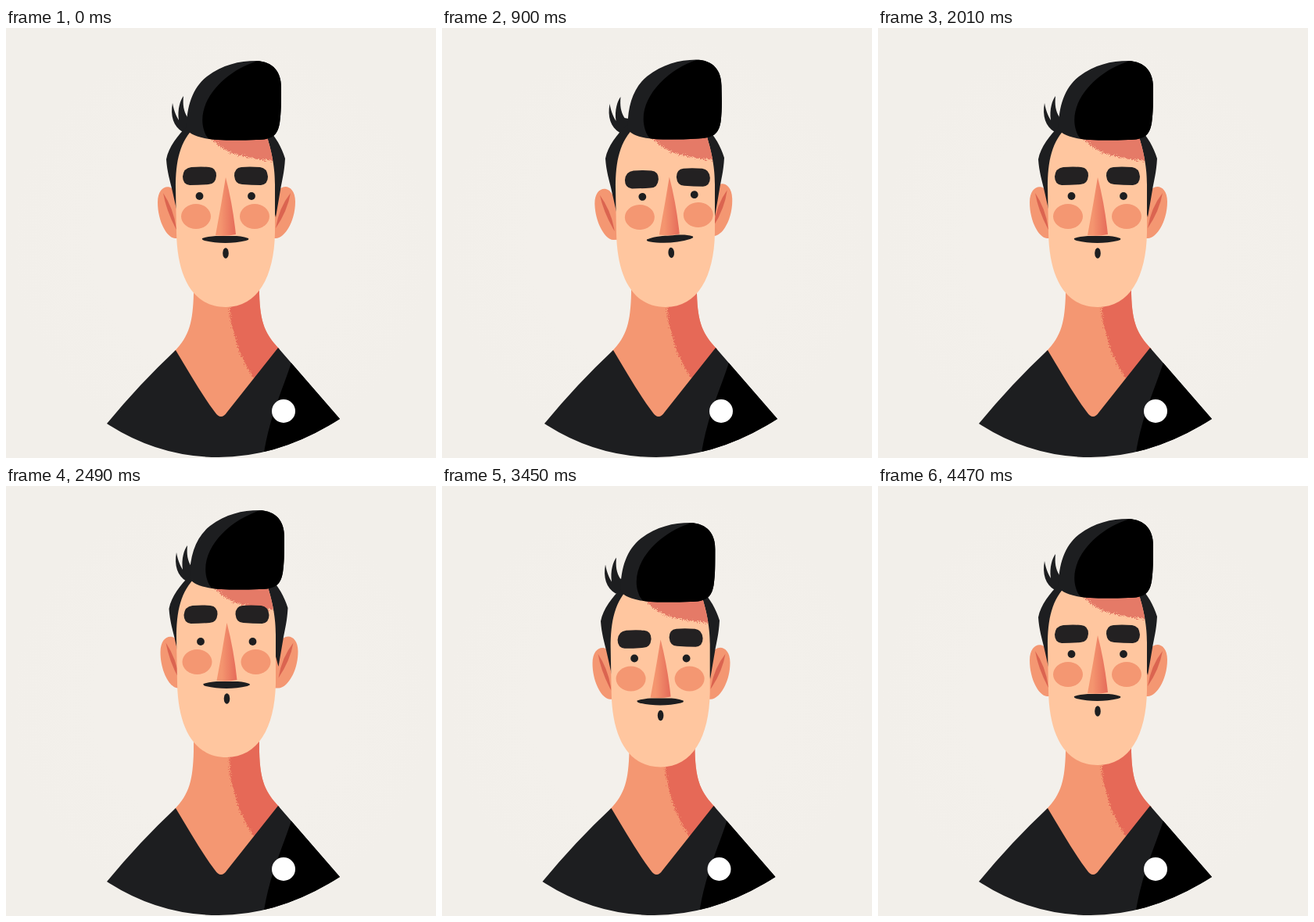
Animation, 550 px wide and 550 px high, one loop 4500 ms. Source, as an HTML page:

```html
<!DOCTYPE html>
<html lang="en">
<head>
<meta charset="utf-8">
<title>Portrait</title>
<style>
html, body { margin: 0; height: 100%; overflow: hidden; background: #f2efea; }
svg { display: block; width: 100%; height: 100%; }
.ink { fill: #1d1e20; }
.brow { fill: #232122; }
.skin { fill: #ffc69f; }
.tan { fill: #f49772; }
.shade { fill: #e66957; }
.crease { fill: #db6450; }
.lid { fill: none; stroke: #1d1e20; stroke-width: 3; stroke-linecap: round; }
</style>
</head>
<body>
<svg viewBox="0 0 550 550">
  <defs>
    <radialGradient id="paper">
      <stop offset=".6" stop-color="#f3f0eb"/><stop offset="1" stop-color="#f2efea"/>
    </radialGradient>
    <linearGradient id="noseTone">
      <stop offset=".25" stop-color="#f4956f"/><stop offset=".9" stop-color="#e7705c"/>
    </linearGradient>
    <filter id="grain" color-interpolation-filters="sRGB">
      <feTurbulence type="fractalNoise" baseFrequency=".7" numOctaves="2" seed="4"/>
      <feDisplacementMap in="SourceGraphic" scale="9" xChannelSelector="R" yChannelSelector="G"/>
    </filter>
    <path id="neckShape" d="M240 290V340C239 375 235 394 215 414L265 510H285L350 411C332 392 325 378 324 340V290Z"/>
    <path id="shirtShape" d="M129 506Q171 455 217 412C234 440 249 467 267 491Q275 503 283 491L348 409 427 500Q350 549 272 549Q195 549 129 506Z"/>
    <path id="faceShape" d="M243 125C222 145 217 170 217 205L218 262C219 320 240 357 281 357C322 357 343 318 344 262V200C344 180 341 160 331 130Z"/>
    <path id="hairShape" d="M231 127C231 100 239 76 257 62C277 47 298 42 320 42C342 43 352 56 352 76C352 96 352 108 350 122C347 138 340 143 320 143C295 144 270 144 254 141C240 138 232 134 231 127Z"/>
    <clipPath id="inNeck"><use href="#neckShape"/></clipPath>
    <clipPath id="inShirt"><use href="#shirtShape"/></clipPath>
    <clipPath id="inFace"><use href="#faceShape"/></clipPath>
    <clipPath id="inHair"><use href="#hairShape"/></clipPath>
  </defs>

  <circle cx="275" cy="279" r="270" fill="url(#paper)"/>

  <g id="body">
    <use href="#neckShape" class="tan"/>
    <g clip-path="url(#inNeck)">
      <path class="shade" filter="url(#grain)" d="M284 320L286 360C289 390 300 425 320 452L370 420V320Z"/>
    </g>
    <use href="#shirtShape" class="ink"/>
    <path clip-path="url(#inShirt)" d="M367 420C360 450 336 495 329 550H440V420Z"/>
    <circle cx="355" cy="490" r="15" fill="#fff"/>
  </g>

  <g id="earL">
    <path class="tan" d="M217 211C211 198 194 201 194 223C194 246 205 268 216 269H235V211Z"/>
    <path class="crease" d="M201 211Q215 232 218 258Q205 234 201 211Z"/>
  </g>
  <g id="earR">
    <path class="tan" d="M347 211C352 198 370 200 370 222C370 248 356 269 345 269H328V211Z"/>
    <path class="crease" d="M364 211Q349 230 345 256Q360 234 364 211Z"/>
  </g>
  <path id="tuft" class="ink" d="M242 133H226C214 126 210 112 213 96C215 107 218 113 221 118C219 104 223 92 227 87C226 98 227 106 232 114L242 116Z"/>
  <path id="sides" class="ink" d="M232 125C220 137 208 152 205 168C206 184 210 196 212 205L219 236 250 150H320L345 242 351 207C353 195 356 185 357 167C352 151 345 140 336 130Z"/>

  <g id="face">
    <use href="#faceShape" class="skin"/>
    <g clip-path="url(#inFace)">
      <path id="forehead" fill="#e57a67" filter="url(#grain)" d="M255 128L266 145C283 162 308 169 365 171V128Z"/>
    </g>
  </g>

  <g id="features">
    <ellipse class="tan" cx="243" cy="241" rx="19" ry="16"/>
    <ellipse class="tan" cx="318" cy="241" rx="19" ry="16"/>
    <path id="nose" fill="url(#noseTone)" d="M281 191Q290 226 294 264Q281 267 268 265Q275 228 281 191Z"/>
    <g id="eyeL"><ellipse class="ink" rx="4.9" ry="4.9"/><path class="lid" d="M-6 2Q-1 -2 6 0"/></g>
    <g id="eyeR"><ellipse class="ink" rx="4.9" ry="4.9"/><path class="lid" d="M-6 2Q-1 -2 6 0"/></g>
    <path id="browL" class="brow" d="M237 178Q250 177 260 178Q269 179 269 189Q268 200 259 200Q247 201 235 201Q226 200 226 190Q227 179 237 178Z"/>
    <path id="browR" class="brow" d="M325 178Q311 177 301 178Q292 179 292 189Q293 200 302 200Q314 201 326 201Q335 200 335 190Q334 179 325 178Z"/>
    <g id="mouth" class="ink">
      <path d="M251 269C263 265 273 266 281 266C290 266 300 265 310 269C311 271 309 271 307 272C290 276 271 276 254 272Q250 271 251 269Z"/>
      <ellipse cx="281" cy="288" rx="3.8" ry="6.7"/>
    </g>
  </g>

  <g id="hair">
    <use href="#hairShape" class="ink"/>
    <path clip-path="url(#inHair)" d="M330 40C284 50 242 92 253 130Q256 142 266 146H360V40Z"/>
  </g>
</svg>
<script>
const LOOP = 4500;
const KEYS = ['faceX', 'faceY', 'hairX', 'hairY', 'lookX', 'lookY', 'roll',
  'browY', 'browSkew', 'mouthTilt', 'sideX', 'tuftX', 'bodyX'];
const POSES = {
  rest:   [0, 0, 0, 0, 0, 0, 0, 0, 0, 0, 0, 0, 0],
  right:  [5, 0, 6, -1, 9.8, -.5, -2.3, 3.5, 0, -1.5, 4, 1.5, 2],
  back:   [2.5, .5, .5, -1, 4.8, -.3, -2, -1, 0, 0, -1, -5, 2],
  up:     [1, -10, 4, -11, 1.5, -16, 0, -9, 0, 0, 3.5, 5, 0],
  down:   [-1.5, 6, -3, 11, -1.5, 14, 0, -3.5, 4, 3.5, -2, -5, -.5],
  settle: [-1.3, 2.5, -2.5, 5, -1.4, 5.5, 0, .3, 1, 0, -2, -4, -.5]
};
// time, pose, strength
const TIMELINE = [
  [0, 'rest', 1], [60, 'rest', 1], [390, 'right', 1], [1250, 'right', 1],
  [1500, 'back', 1], [1800, 'rest', 1], [2260, 'rest', 1], [2490, 'up', 1],
  [2650, 'up', 1.3], [2940, 'down', 1], [3450, 'settle', 1], [3900, 'rest', 1], [LOOP, 'rest', 1]
];
const BLINKS = [1520, 2828];

const $ = id => document.getElementById(id);
const clamp = v => Math.max(0, Math.min(1, v));
const move = (id, x, y, turn = '') => $(id).setAttribute('transform', `translate(${x} ${y}) ${turn}`);
const rotate = (angle, x, y) => `rotate(${angle} ${x} ${y})`;

function poseAt(t) {
  const i = TIMELINE.findIndex(key => key[0] > t);
  const [t0, from, a] = TIMELINE[i - 1], [t1, to, b] = TIMELINE[i];
  const u = (t - t0) / (t1 - t0), k = u * u * (3 - 2 * u);
  return Object.fromEntries(KEYS.map((name, n) =>
    [name, POSES[from][n] * a * (1 - k) + POSES[to][n] * b * k]));
}

function drawEye(id, x, t, lead) {
  const shut = Math.max(...BLINKS.map(c => clamp(1.8 - Math.abs(t - c + lead) / 80)));
  const [ball, lid] = $(id).children;
  const closed = shut > .8;
  move(id, x, 215);
  ball.setAttribute('ry', closed ? 0 : 4.9 * (1 - shut));
  lid.setAttribute('opacity', closed ? 1 : 0);
}

function draw(t) {
  const p = poseAt(t);
  const earX = p.sideX - p.bodyX, earY = (p.faceY + p.hairY) / 2;
  const turn = rotate(p.roll, 281, 240);
  move('body', p.bodyX, 0);
  move('earL', earX, earY, turn);
  move('earR', earX, earY, turn);
  move('tuft', p.tuftX, p.hairY + p.bodyX);
  move('sides', p.sideX, p.hairY);
  move('face', p.faceX, p.faceY);
  move('forehead', p.hairX - p.faceX, p.hairY - p.faceY);
  move('features', p.lookX, p.lookY, turn);
  // nose and brows stay upright while the features roll
  move('nose', 0, 0, rotate(-p.roll, 281, 240));
  move('browL', 0, p.browY + p.browSkew, rotate(-p.roll, 247, 189));
  move('browR', 0, p.browY - p.browSkew, rotate(-p.roll, 314, 189));
  move('mouth', 0, 0, rotate(p.mouthTilt, 281, 270));
  move('hair', p.hairX, p.hairY, rotate(p.roll / 2, 290, 95));
  drawEye('eyeL', 247.5, t, 0);
  drawEye('eyeR', 314, t, 46);
}

const start = performance.now();
function tick() {
  draw((performance.now() - start) % LOOP);
  requestAnimationFrame(tick);
}
tick();
</script>
</body>
</html>
```
